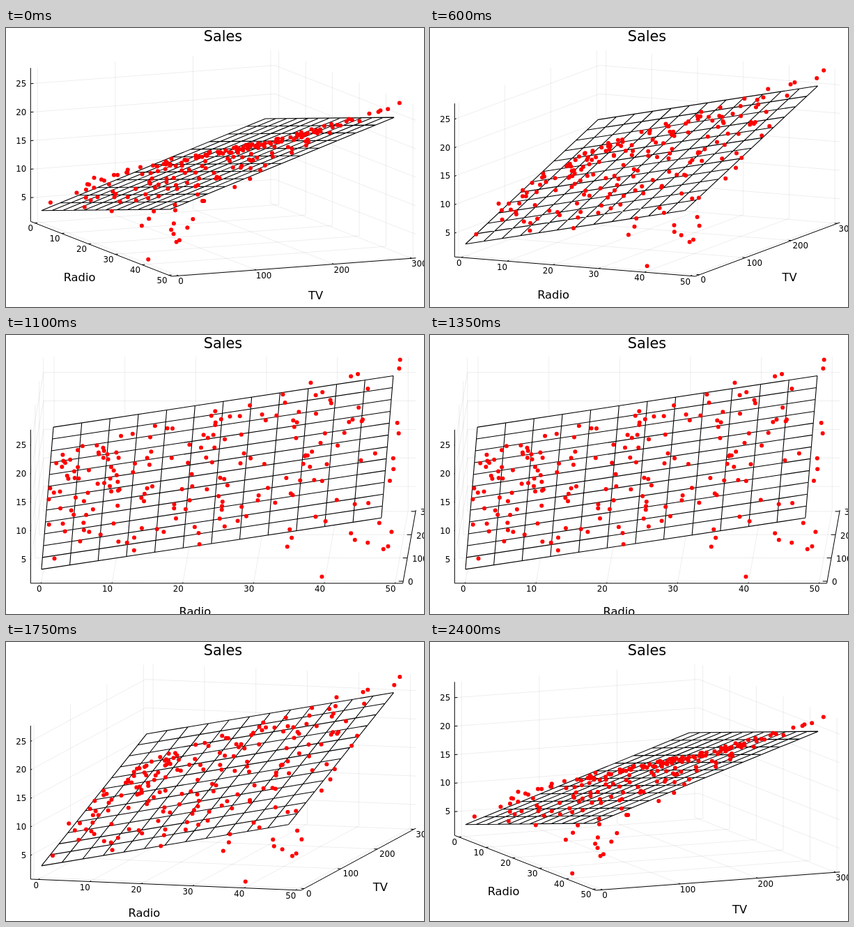
Write an HTML page that moves like this. It is 600 px wide and 400 px high and loops after 2500 ms.

```html
<!DOCTYPE html>
<html lang="en">
<head>
<meta charset="utf-8">
<title>Sales</title>
<style>
  html, body { margin: 0; width: 100%; height: 100%; overflow: hidden; background: #fff; }
  svg { display: block; width: 600px; height: 400px; }
  text { font-family: "DejaVu Sans", sans-serif; fill: #000; }
  .tick { font-size: 11.8px; }
  .guide { font-size: 16.3px; text-anchor: middle; }
  .title { font-size: 20.8px; text-anchor: middle; }
</style>
</head>
<body>
<svg id="stage" viewBox="0 0 600 400"></svg>
<script>
const stage = document.getElementById('stage');
const STEP = 50, STEPS = 50;
const LEFT = 35.3, BASE = 356, WIDTH = 553, DEPTH = 105, HEIGHT = 220;
const TICK_SIZE = 11.8, GUIDE_SIZE = 16.3, TICK = 0.012, GAP = 8;

const range = (from, to, step) =>
  Array.from({ length: Math.round((to - from) / step) + 1 }, (_, i) => from + i * step);

// axis limits: data extent widened by 3 %
const scale = (lo, hi) => {
  const pad = (hi - lo) * 0.03;
  return x => (x - lo + pad) / (hi - lo + 2 * pad);
};
const TV_MAX = 296.4, RADIO_MAX = 49.6;
const radio = scale(0, RADIO_MAX), tv = scale(0, TV_MAX), sales = scale(1.6, 27);
const radioTicks = range(0, 50, 10);
const tvTicks = range(0, 300, 100);
const salesTicks = range(5, 25, 5);

let seed = 20;
const rand = () => (seed = (seed * 1664525 + 1013904223) % 4294967296) / 4294967296;

// sales grow with a root of TV, and radio multiplies the effect
const response = (t, r) =>
  3.25 * t ** 0.22 + 0.00625 * t ** 0.7 * r - 2.25 * Math.exp(-t / 2);
const plane = (t, r) => 2.921 + 0.04575 * t + 0.188 * r;
const place = (t, r, s) => [radio(r), tv(t), sales(s)];

// a few extremes, then an even spread with jitter
const extremes = [[0.7, 39.6], [8.7, 48.9], [276.9, 48.9], [287.6, 43], [296.4, 36.3], [290.7, 4.1]];
const points = extremes.map(([t, r]) => place(t, r, response(t, r)));
const SPREAD = 194;
for (let i = 0; i < SPREAD; i++) {
  const t = 5 + (TV_MAX - 8) * (i + rand()) / SPREAD;
  const r = RADIO_MAX * ((i * 0.618034 + rand() * 0.5) % 1) ** 1.08;
  points.push(place(t, r, response(t, r) + (rand() - 0.5) * 0.9));
}

function add(name, attrs, content) {
  const el = document.createElementNS('http://www.w3.org/2000/svg', name);
  for (const key in attrs) el.setAttribute(key, attrs[key]);
  if (content !== undefined) el.textContent = content;
  return stage.appendChild(el);
}
const line = (width, opacity = 1) =>
  add('path', { fill: 'none', stroke: '#000', 'stroke-width': width, 'stroke-opacity': opacity });
const labels = (values, anchor) =>
  values.map(v => add('text', { class: 'tick', 'text-anchor': anchor }, v));

add('rect', { width: 600, height: 400, fill: '#fff' });
const grid = line(0.7, 0.1);
const axes = line(1);
const sheet = add('path', { fill: '#fff' });
const mesh = line(1.1);
const dots = points.map(() => add('circle', { r: 3, fill: '#f00' }));
const radioLabels = labels(radioTicks, 'end');
const tvLabels = labels(tvTicks, 'start');
const salesLabels = labels(salesTicks, 'end');
const radioGuide = add('text', { class: 'guide' }, 'Radio');
const tvGuide = add('text', { class: 'guide' }, 'TV');
add('text', { class: 'title', x: 311.5, y: 19 }, 'Sales');

function put(el, x, y, size) {
  el.setAttribute('x', x.toFixed(2));
  el.setAttribute('y', (y + size * 0.365).toFixed(2));
}

function draw(degrees) {
  const a = degrees * Math.PI / 180, c = Math.cos(a), s = Math.sin(a);
  const project = ([u, v, w]) => [
    LEFT + WIDTH * (u * c + v * s) / (c + s),
    BASE - DEPTH * ((1 - u) * s * s + v * c * c) - HEIGHT * w
  ];
  const path = (...list) =>
    'M' + list.map(p => project(p).map(n => n.toFixed(2)).join(' ')).join('L');
  // unit normal of a floor axis, pointing away from the box
  const normal = (from, to) => {
    const [x0, y0] = project(from), [x1, y1] = project(to);
    const len = Math.hypot(x1 - x0, y1 - y0);
    return [(y0 - y1) / len, (x1 - x0) / len];
  };

  const gridParts = [], meshParts = [];
  const axisParts = [path([0, 0, 1], [0, 0, 0], [1, 0, 0], [1, 1, 0])];

  const [rnx, rny] = normal([0, 0, 0], [1, 0, 0]);
  radioTicks.forEach((value, i) => {
    const u = radio(value), [x, y] = project([u, 0, 0]);
    gridParts.push(path([u, 0, 0], [u, 1, 0], [u, 1, 1]));
    axisParts.push(path([u, 0, 0], [u, TICK, 0]));
    put(radioLabels[i], x + GAP * rnx + 1, y + GAP * rny, TICK_SIZE);
  });

  const [tnx, tny] = normal([1, 0, 0], [1, 1, 0]);
  tvTicks.forEach((value, i) => {
    const v = tv(value), [x, y] = project([1, v, 0]);
    gridParts.push(path([1, v, 0], [0, v, 0], [0, v, 1]));
    axisParts.push(path([1, v, 0], [1 - TICK, v, 0]));
    put(tvLabels[i], x + GAP * tnx - 1, y + GAP * tny - 0.3, TICK_SIZE);
  });

  salesTicks.forEach((value, i) => {
    const w = sales(value), y = project([0, 0, w])[1];
    gridParts.push(path([0, 0, w], [0, 1, w], [1, 1, w]));
    axisParts.push(path([0, 0, w], [0, TICK, w]));
    put(salesLabels[i], 29.2, y - 0.3, TICK_SIZE);
  });

  const on = (t, r) => place(t, r, plane(t, r));
  for (let i = 0; i <= 12; i++) {
    meshParts.push(path(on(i * 24, 0), on(i * 24, 48)), path(on(0, i * 4), on(288, i * 4)));
  }
  grid.setAttribute('d', gridParts.join(''));
  axes.setAttribute('d', axisParts.join(''));
  mesh.setAttribute('d', meshParts.join(''));
  sheet.setAttribute('d', path(on(0, 0), on(288, 0), on(288, 48), on(0, 48)) + 'Z');

  points.forEach((p, i) => {
    const [x, y] = project(p);
    dots[i].setAttribute('cx', x.toFixed(2));
    dots[i].setAttribute('cy', y.toFixed(2));
  });

  const [rx, ry] = project([0.5, 0, 0]), [tx, ty] = project([1, 0.5, 0]);
  put(radioGuide, rx - 31, ry + 40, GUIDE_SIZE);
  put(tvGuide, tx + 31.5, ty + 40, GUIDE_SIZE);
}

let shown = -1;
function tick() {
  const i = Math.floor(performance.now() / STEP) % STEPS;
  const angle = Math.round(30 + 30 * Math.cos(2 * Math.PI * i / (STEPS - 1)));
  if (angle !== shown) draw(shown = angle);
  requestAnimationFrame(tick);
}
tick();
</script>
</body>
</html>
```
